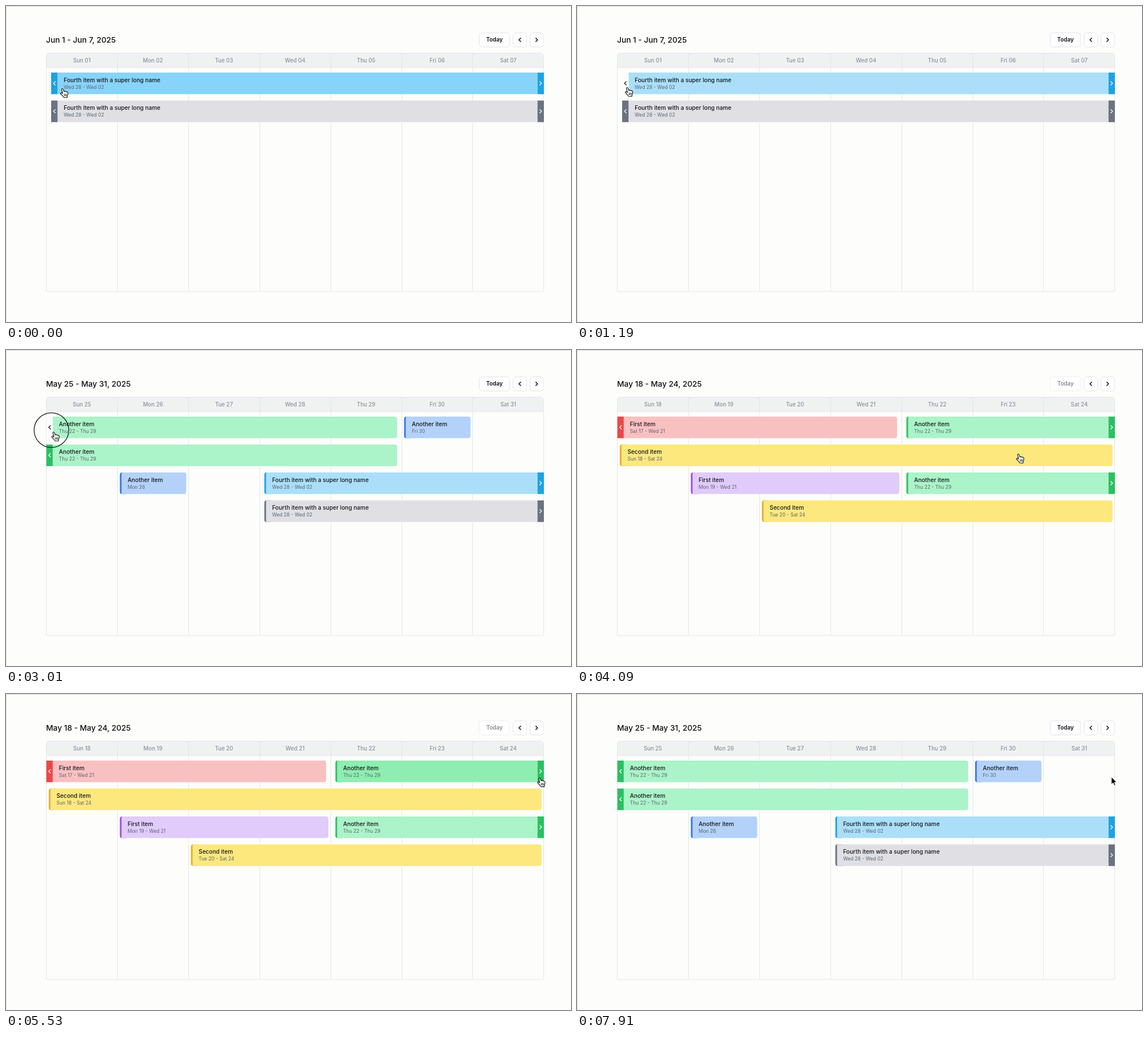
Write an HTML page that moves like this. It is 1001 px wide and 560 px high and loops after 8000 ms.

```html
<!DOCTYPE html>
<html lang="en">
<head>
<meta charset="utf-8">
<title>Week calendar</title>
<style>
  html, body { margin: 0; width: 100%; height: 100%; overflow: hidden; background: #fdfdfb; }
  svg { display: block; width: 1001px; height: 560px; font-family: Inter, "Open Sans", sans-serif; }
  .title { font-size: 13.75px; font-weight: 500; fill: #0c0d10; }
  .day { font-size: 9.75px; font-weight: 500; fill: #8c90a0; text-anchor: middle; }
  .name { font-size: 10.2px; font-weight: 450; fill: #14161b; }
  .dates { font-size: 8.6px; fill: #5c6474; }
  .today { font-size: 9.9px; font-weight: 600; fill: #0c0d10; text-anchor: middle; }
  .off .today { font-weight: 500; fill: #777980; }
  .off rect.btn { stroke: #efeff4; }
  .btn { fill: #fff; stroke: #e3e3ee; }
  .chev { fill: none; stroke-width: 1.2; stroke-linecap: round; stroke-linejoin: round; }
</style>
</head>
<body>
<svg id="stage" viewBox="0 0 1001 560"></svg>
<script>
const LEFT = 71.5, COL = 125.9, RIGHT = 953, TOP = 118, PITCH = 49.5, BAR = 38.3, GRIP = 11.3;
const DAYS = ['Sun', 'Mon', 'Tue', 'Wed', 'Thu', 'Fri', 'Sat'];

// [normal, hovered, accent]
const COLORS = {
  sky: ['#abdff9', '#88d3f9', '#1fa2e2'],
  gray: ['#e0e0e4', '#d3d5da', '#6b7280'],
  green: ['#abf3c8', '#8eedb0', '#2bc061'],
  blue: ['#b4d2f9', '#9cc4f8', '#3a7bda'],
  red: ['#f9c0c1', '#f7a5a6', '#ee4646'],
  yellow: ['#fce87d', '#fce87d', '#dfb233'],
  purple: ['#e0cbfa', '#d4b4f8', '#9f52d9']
};

const LONG = 'Fourth item with a super long name';
const OTHER = 'Another item';

// row, first column, end column, left inset, right inset, color, name, dates, grips
const WEEKS = [
  { title: 'Jun 1 - Jun 7, 2025', first: 1, bars: [
    [0, 0, 7, 8.5, 0, 'sky', LONG, 'Wed 28 - Wed 02', '<>'],
    [1, 0, 7, 8.5, 0, 'gray', LONG, 'Wed 28 - Wed 02', '<>']] },
  { title: 'May 25 - May 31, 2025', first: 25, bars: [
    [0, 0, 5, 0, 8, 'green', OTHER, 'Thu 22 - Thu 29', '<'],
    [0, 5, 6, 4.3, 4, 'blue', OTHER, 'Fri 30', ''],
    [1, 0, 5, 0, 8, 'green', OTHER, 'Thu 22 - Thu 29', '<'],
    [2, 1, 2, 4.3, 4, 'blue', OTHER, 'Mon 26', ''],
    [2, 3, 7, 8.5, 0, 'sky', LONG, 'Wed 28 - Wed 02', '>'],
    [3, 3, 7, 8.5, 0, 'gray', LONG, 'Wed 28 - Wed 02', '>']] },
  { title: 'May 18 - May 24, 2025', first: 18, off: true, bars: [
    [0, 0, 4, 0, 8, 'red', 'First item', 'Sat 17 - Wed 21', '<'],
    [0, 4, 7, 8.5, 0, 'green', OTHER, 'Thu 22 - Thu 29', '>'],
    [1, 0, 7, 4.3, 4, 'yellow', 'Second item', 'Sun 18 - Sat 24', ''],
    [2, 1, 4, 4.3, 4, 'purple', 'First item', 'Mon 19 - Wed 21', ''],
    [2, 4, 7, 8.5, 0, 'green', OTHER, 'Thu 22 - Thu 29', '>'],
    [3, 2, 7, 4.3, 4, 'yellow', 'Second item', 'Tue 20 - Sat 24', '']] }
];

// Each press: first step, step of release, week shown after it
const CLICKS = [[27, 32, 1], [63, 68, 2], [149, 154, 1]];
// Pointer path: step, x, y
const PATH = [
  [0, 96, 143], [12, 85, 141], [32, 85, 141], [44, 83.6, 141.5], [56, 83.6, 141.5],
  [63, 80.5, 142], [70, 80.5, 142], [87, 778, 181], [93, 798, 183], [107, 798, 183],
  [119, 941.3, 145.2], [124, 949.3, 146], [154, 949.3, 146], [164, 945.2, 145.6], [171, 945.2, 145.6]
];

const stage = document.getElementById('stage');

function add(parent, tag, attrs, text) {
  const el = document.createElementNS('http://www.w3.org/2000/svg', tag);
  for (const key in attrs) el.setAttribute(key, attrs[key]);
  if (text) el.textContent = text;
  parent.appendChild(el);
  return el;
}

function label(parent, cls, x, y, text) {
  return add(parent, 'text', { class: cls, x, y }, text);
}

function chevron(parent, x, y, dir, stroke, w = 1.6, h = 3) {
  return add(parent, 'path', {
    class: 'chev', stroke, d: `M${x - dir * w} ${y - h}L${x + dir * w} ${y}L${x - dir * w} ${y + h}`
  });
}

// Box with separate left and right corner radii
function box(x, y, w, h, l, r) {
  return `M${x + l} ${y}H${x + w - r}q${r} 0 ${r} ${r}V${y + h - r}q0 ${r} ${-r} ${r}` +
    `H${x + l}q${-l} 0 ${-l} ${-l}V${y + l}q0 ${-l} ${l} ${-l}Z`;
}

function drawBase() {
  add(stage, 'rect', { width: 1001, height: 560, fill: '#fdfdfb' });
  add(stage, 'path', { d: 'M0 .5H1001M.5 0V560', stroke: '#dedfdd' });
  add(stage, 'path', { d: 'M71.5 109V90q0-6.5 6.5-6.5H946q6.5 0 6.5 6.5V109Z', fill: '#f0f1f1' });
  let lines = 'M71.5 506V90q0-6.5 6.5-6.5H946q6.5 0 6.5 6.5V506ZM71.5 109H952.5';
  for (let i = 1; i < 7; i++) lines += `M${Math.floor(LEFT + i * COL) + .5} 83.5V506`;
  add(stage, 'path', { d: lines, fill: 'none', stroke: '#e4e5ee' });
  for (const [x, dir] of [[898, -1], [928, 1]]) {
    add(stage, 'rect', { class: 'btn', x: x + .5, y: 47.5, width: 24, height: 25, rx: 5 });
    chevron(stage, x + 12.3, 60, dir, '#0c0d10', 1.5, 2.9).style.strokeWidth = 1.5;
  }
}

function drawBar(parent, [row, from, to, padL, padR, color, name, dates, grips]) {
  const x = LEFT + from * COL + padL;
  const end = to === 7 && !padR ? RIGHT : LEFT + to * COL - padR;
  const y = TOP + row * PITCH, w = end - x;
  const [normal, hovered, accent] = COLORS[color];
  const prev = grips.includes('<'), next = grips.includes('>');
  if (!prev) add(parent, 'path', { d: box(x, y, 12, BAR, 4, 0), fill: accent });
  const edge = prev ? GRIP : 3;
  const body = add(parent, 'path', {
    d: box(x + edge, y, w - edge - (next ? GRIP : 0), BAR, prev ? 0 : 2, next ? 0 : 4), fill: normal
  });
  const parts = [];
  const grip = (gx, dir) => {
    const rect = add(parent, 'rect', { x: gx, y, width: GRIP, height: BAR, fill: accent });
    const mark = chevron(parent, gx + GRIP / 2, y + 19, dir, '#fff');
    parts.push({ x: gx, rect, mark });
  };
  if (prev) grip(x, -1);
  if (next) grip(end - GRIP, 1);
  const tx = x + (prev ? 22.3 : 13.7);
  label(parent, 'name', tx, y + 16.6, name);
  label(parent, 'dates', tx, y + 28.6, dates);

  // Updates the hover look and tells whether the pointer is over the bar
  return (px, py) => {
    const over = px >= x && px < end && py >= y && py < y + BAR;
    const hot = over && parts.find(p => px >= p.x && px < p.x + GRIP);
    body.setAttribute('fill', over && !hot ? hovered : normal);
    for (const p of parts) {
      p.rect.setAttribute('fill', p === hot ? '#fdfdfb' : accent);
      p.mark.setAttribute('stroke', p === hot ? '#14161b' : '#fff');
    }
    return over;
  };
}

function drawWeek({ title, first, off, bars }) {
  const g = add(stage, 'g', { class: off ? 'off' : '' });
  label(g, 'title', 71, 64.6, title);
  add(g, 'rect', { class: 'btn', x: 838.5, y: 47.5, width: 53.5, height: 25, rx: 5 });
  label(g, 'today', 865.4, 63.3, 'Today');
  DAYS.forEach((day, i) => {
    const date = String(first + i).padStart(2, '0');
    label(g, 'day', LEFT + (i + .5) * COL, 99.6, `${day} ${date}`);
  });
  return { g, hovers: bars.map(bar => drawBar(g, bar)) };
}

drawBase();
const weeks = WEEKS.map(drawWeek);

const ring = add(stage, 'circle', { r: 30.7, fill: 'none', stroke: '#17181a', 'stroke-width': 1.3 });
const hand = add(stage, 'g', { stroke: '#111', 'stroke-width': 1.15, 'stroke-linejoin': 'round', 'stroke-linecap': 'round' });
add(hand, 'path', {
  fill: '#fff',
  d: 'M2.6 5.3C2.2 3.2 4.8 2.8 5.4 4.8L6.6 8.7C7.3 7.5 9 7.7 9.3 8.9C10.2 8.1 11.4 8.5 11.7 9.5' +
    'C12.6 9.1 13.6 9.8 13.7 11C13.9 14 12.8 15 12.4 17.5L12.3 19.2H6.4C5.8 17 2.6 14.8 .8 12.4C0 11.2 1.6 10 2.9 11L4.4 12.2Z'
});
add(hand, 'path', { d: 'M7.2 13v3.4M9.1 13v3.4M11 13v3.4', 'stroke-width': .9 });
const arrow = add(stage, 'path', {
  d: 'M1.6 1.4V14.6L4.7 11.8L6.8 16.6L9 15.6L7 11H11Z',
  fill: '#0b0b0b', stroke: '#fff', 'stroke-width': .9, 'stroke-linejoin': 'round'
});

const show = (el, on) => el.setAttribute('display', on ? 'inline' : 'none');
const move = (el, x, y) => el.setAttribute('transform', `translate(${x} ${y})`);

function stepAt(ms) {
  const t = Math.max(0, ms - 30), beat = Math.floor(t / 140), rest = t % 140;
  return beat * 3 + (rest < 20 ? 0 : rest < 40 ? 1 : 2);
}

function pointerAt(step) {
  const i = Math.max(1, PATH.findIndex(p => p[0] >= step));
  const [s0, x0, y0] = PATH[i - 1], [s1, x1, y1] = PATH[i];
  const u = (step - s0) / (s1 - s0), e = u * u * (3 - 2 * u);
  return [x0 + (x1 - x0) * e, y0 + (y1 - y0) * e];
}

let last = -1;
function render() {
  const step = stepAt(performance.now() % 8000);
  if (step !== last) {
    last = step;
    const [x, y] = pointerAt(step);
    const current = CLICKS.reduce((week, [, up, next]) => step >= up ? next : week, 0);
    weeks.forEach((week, i) => show(week.g, i === current));
    const over = weeks[current].hovers.map(hover => hover(x, y)).some(Boolean);
    show(hand, over);
    show(arrow, !over);
    show(ring, CLICKS.some(([down, up]) => step >= down && step < up));
    for (const el of [hand, arrow, ring]) move(el, x, y);
  }
  requestAnimationFrame(render);
}
render();
</script>
</body>
</html>
```
